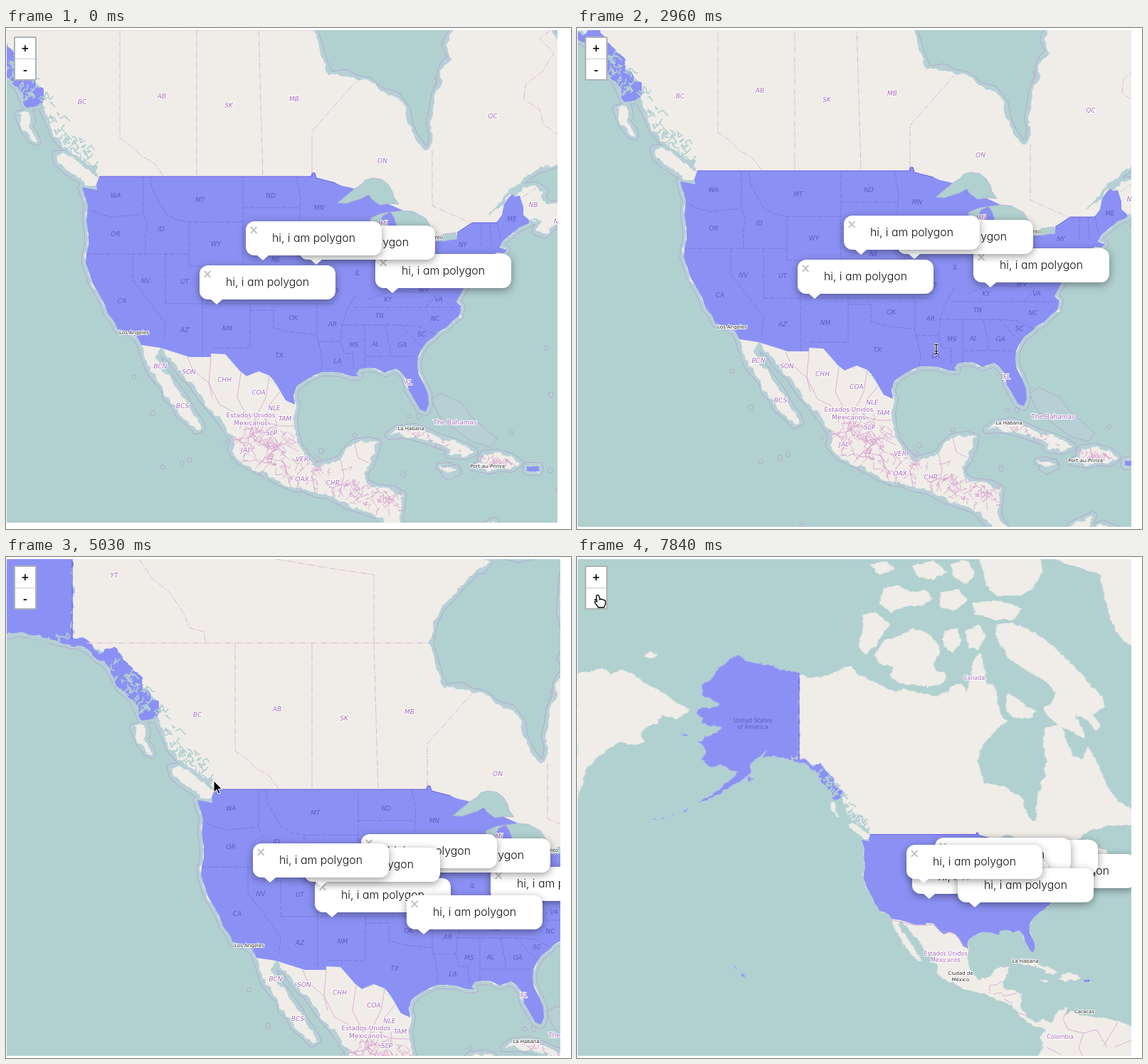
These frames come from a looping animation (794 px wide and 705 px high, 8 s). An HTML page:

```html
<!DOCTYPE html>
<html lang="en">
<head>
<meta charset="utf-8">
<title>Polygon popups</title>
<style>
html, body { margin: 0; width: 100%; height: 100%; overflow: hidden; background: #fff; }
#map { position: absolute; left: 1px; top: 3px; overflow: hidden; background: #b1d0d0; }
#stage { position: absolute; left: -1px; top: -3px; width: 794px; height: 705px; }
svg { position: absolute; left: 0; top: 0; overflow: visible; }
path { vector-effect: non-scaling-stroke; }
.rim { fill: none; stroke: #b0adcb; stroke-width: 12; stroke-linejoin: round; }
.shelf { fill: none; stroke: #b6d0d6; stroke-width: 10; stroke-linejoin: round; }
.ground { fill: #f0ede8; stroke: none; }
.us { fill: #8b91f4; stroke: none; }
.lake { fill: #b1d0d0; stroke: #b3add2; stroke-width: .7; }
.fjord { fill: none; stroke: #b1d0d0; stroke-width: 1.6; }
.state { fill: none; stroke: #7173dc; stroke-width: .8; stroke-dasharray: 7 2; }
.province { fill: none; stroke: #dcb4da; stroke-width: 1; stroke-dasharray: 9 2 2 2; }
.nation { fill: none; stroke: #665ce0; stroke-width: 1; }
.mesh { fill: none; stroke: #d7a0d0; stroke-width: .8; }
.ring { fill: #b6d0d6; stroke: #b0adcb; stroke-width: 1; }
text { font: 9px "DejaVu Sans", sans-serif; text-anchor: middle; dominant-baseline: central;
  fill: #a266b4; stroke: #fff; stroke-width: 2px; paint-order: stroke; }
.abbr text { font-style: italic; }
.inside text { fill: #5f58c2; stroke: none; }
.city text { font-size: 7px; fill: #222; }
#far text { font-size: 8px; }
#far .city text { font-size: 7px; }
.popup { position: absolute; width: 191px; height: 48px; border-radius: 12px; background: #fff;
  box-shadow: 0 3px 12px rgba(0,0,0,.4); color: #111; text-align: center;
  font: 300 15.8px/47px Inter, sans-serif; font-feature-settings: "cv11"; }
.popup::before { content: "×"; position: absolute; left: 4px; top: 4px; color: #c3c3c3;
  font: bold 17px/17px "DejaVu Sans", sans-serif; }
.popup::after { content: ""; position: absolute; left: 16px; top: 47.5px;
  border: 8px solid transparent; border-top: 7px solid #fff; border-bottom: 0; }
#zoom { position: absolute; left: 11px; top: 12px; width: 28px; height: 58px; border: 2px solid #aeb3b3;
  border-radius: 2px; background: #fff; font: 18px/29px "Open Sans", sans-serif; text-align: center; font-weight: 600; }
#zoom div + div { border-top: 1px solid #ccc; }
#desk { position: absolute; top: 0; right: 0; bottom: 0; background: linear-gradient(#8a8880, #e4e2df 6%,
  #8f8d87 20%, #a9a7a2 35%, #d8d6d2 50%, #c9c7c2 59%, #75756e 63%, #66706f 80%, #4e606e); }
</style>
</head>
<body>
<div id="map"><div id="stage">
<svg width="794" height="705">
<defs>
  <filter id="rough" x="-2%" y="-2%" width="104%" height="104%" color-interpolation-filters="sRGB">
    <feTurbulence type="fractalNoise" baseFrequency=".07" numOctaves="3" seed="4"/>
    <feDisplacementMap in="SourceGraphic" scale="11" xChannelSelector="R" yChannelSelector="G"/>
  </filter>
  <g id="lower">
    <path d="M131 209H431V490L418 497 408 505 404 517 406 530 393 524 386 512 378 498 370 489 355 483 345 487 338 490 328 482 318 470 308 459 288 458 288 463 258 463 217 450 190 446 185 436 172 428 157 424 152 413 143 402 138 388 131 375 122 360 117 345 112 330 113 318 116 305 116 290 113 270 115 250 111 238 107 224 118 226 128 228 127 220Z"/>
    <path d="M428 209 430 204 434 204 436 211 447 214 463 218 472 222 486 225 494 228 556 256 590 300 614 300 634 297 634 288 655 274 689 274 697 263 700 248 706 239 711 234 715 237 722 236 727 252 727 263 735 270 735 275 722 280 710 290 698 300 694 309 703 312 700 317 690 316 670 328 655 350 640 372 633 385 640 392 637 405 628 412 618 422 607 428 600 436 591 442 584 452 579 463 578 475 580 487 587 501 593 515 594 530 590 540 582 537 574 523 566 510 563 495 556 485 548 479 540 482 532 485 520 479 508 478 497 480 492 487 496 490 487 490 478 488 470 485 456 484 444 484 428 491Z"/>
    <path d="M732 617h17v7h-17z"/>
  </g>
  <g id="alaska">
    <g transform="matrix(2 0 0 2 -693 -572)">
      <path d="M312 163 300 160 285 158 270 152 255 150 240 147 228 138 215 143 207 150 195 160 188 172 176 178 176 195 188 200 200 208 190 212 172 213 167 220 178 226 175 235 190 237 203 240 197 248 180 252 175 262 182 275 175 285 190 297 203 292 215 300 225 302 218 312 205 322 190 335 170 345 180 344 200 333 220 320 235 312 245 303 243 290 255 283 265 272 262 283 275 280 290 283 303 287 312 288Z"/>
      <path d="M144 248l13 2-3 3zM171 258l8 1-3 4zM240 309l8 2-6 8zM150 357l8-4-6 6zM132 363l6-3-4 5zM118 368l6-2-4 4zM108 368l5 0-4 2zM211 573l3 2-3 1zM221 577l4 2-3 1zM230 584l6 4-3 4z"/>
    </g>
    <path transform="translate(-162 -118)" d="M90 113 112 115 120 125 132 135 142 130 152 126 162 139 168 150 180 158 190 170 197 187 205 197 214 203 214 218 207 227 190 228 185 215 178 200 160 185 150 165 140 150 128 143 115 130 100 123 90 124Z"/>
  </g>
  <g id="land">
    <use href="#lower"/><use href="#alaska"/>
    <path d="M-67-116H506L493-93 478-78 466-63 450-48 438-23 433 4 440 27 447 50 455 67 478 64 492 72 510 75 528 90 548 95 563 115 566 135 575 155 588 172 610 175V300H520L430 215H131L126 196 101 181 81 166 68 151 61 132 52 115 46 100 30 75 10 50-10 20-40 10-67-3Z"/>
    <path d="M588 172 597 170 600 150 596 135 600 115 603 95 610 80 612 60 617 50 627 42 618 25 622 15 628 3 617-42 621-92 667-102 687-48 701-12 727-2 743-42 770 10 797 72 830 118 880 140V180L795 185 770 192 745 200 728 212 708 230 690 248 676 264 694 252 712 236 728 224 745 222 757 230 752 240 762 248 795 252V268L772 276 757 290 745 286 752 272 735 270 720 270 650 290 610 295 588 280Z"/>
    <path d="M70 178 85 178 105 190 122 205 133 214 130 222 118 221 100 210 85 200 73 190ZM17 122 33 118 36 130 32 140 40 150 43 160 36 157 26 143Z"/>
    <path d="M217 450 258 463 288 463 288 458 308 459 328 482 338 490 355 483 370 489 386 512 408 528 404 550 406 570 412 590 424 605 436 617 455 612 470 607 478 595 490 584 510 581 522 584 518 598 512 615 502 626 505 640 520 647 545 650 557 657 555 675 552 695 570 720 545 705 530 693 520 685 500 678 480 672 468 665 452 657 435 655 420 648 405 647 388 640 370 630 350 620 330 610 317 595 320 580 312 568 300 550 285 533 275 520 268 510 262 500 250 490 240 478 232 465 222 459Z"/>
    <path d="M190 446 217 450 212 460 218 478 228 490 240 507 250 520 258 535 270 552 275 562 268 566 255 553 243 543 236 528 226 520 222 505 212 495 202 482 196 465Z"/>
    <path d="M538 573 550 565 575 562 590 568 610 577 630 583 648 590 658 597 645 602 622 600 625 592 605 585 585 578 560 572ZM668 605 672 600 690 598 710 604 721 612 710 620 695 618 680 622 658 618 670 613ZM610 618 622 617 634 622 622 626Z"/>
    <g transform="matrix(2 0 0 2 -693 -572)">
      <path d="M312 163 325 170 345 168 357 165 370 158 385 153 395 165 415 175 430 182 445 190 460 185 475 190 490 193 505 195 520 190 528 180 540 178 548 190 553 172 555 155 560 140 568 135 573 160 576 180 585 178 590 190 592 210 597 225 605 230 600 236H312Z"/>
      <path d="M0 163 20 162 35 155 48 165 62 158 80 165 100 180 120 190 140 205 158 215 150 222 140 228 120 222 112 235 100 237 90 248 95 260 80 265 60 260 45 270 25 285 12 300 8 320 0 340ZM93 139 104 133 114 139 104 143Z"/>
      <path d="M402 80 418 78 428 85 440 95 428 110 420 125 405 137 396 125 400 105ZM418 140 430 118 455 110 470 100 490 105 505 120 510 135 500 150 505 160 520 165 515 178 495 182 470 180 450 177 440 165 445 155 425 150ZM515 105 535 100 540 118 528 135 515 125ZM545 105 565 95 575 110 565 130 552 128Z"/>
      <path d="M430 45 450 38 470 50 490 45 500 60 485 68 460 70 440 78 425 65ZM510 50 535 45 550 60 530 75 510 70ZM555 65 590 60 625 72 615 88 585 88 560 80ZM565 0 650 0 655 20 640 45 620 55 590 55 575 40ZM412 10 435 6 447 16 425 26ZM470 12 500 5 520 20 500 32 480 28ZM525 10 548 4 560 25 545 38 530 28Z"/>
      <path d="M590 95 610 92 630 100 650 110 670 125 685 140 705 160 722 180 738 195 742 210 725 222 735 235 730 245 715 228 700 222 712 245 715 258 695 245 675 235 660 222 655 212 668 205 672 190 660 175 640 165 625 155 610 145 595 125 588 108ZM605 190 620 200 632 210 645 215 640 225 625 228 612 225 602 212Z"/>
      <path d="M662 0 690 10 715 18 735 24 742 58 750 90 765 115 790 135V0Z"/>
      <path d="M615 612 625 615 622 632 630 645 645 655 655 650 667 655 675 640 690 633 685 645 697 639 715 647 740 648 765 655 790 665V720H640L655 690 650 675 660 665 645 661 632 655 620 642 608 630Z"/>
    </g>
  </g>
</defs>
<g id="world">
  <g class="near">
    <use href="#land" class="rim"/><use href="#land" class="shelf"/>
    <path class="ring" d="M598 522 612 514 640 528 655 548 690 578 680 590 655 582 625 560 608 545ZM612 618 635 614 640 628 622 636 612 630Z"/>
    <path class="ring" id="islets"/>
  </g>
  <use href="#land" class="ground" filter="url(#rough)"/>
  <path id="tiles" fill="#ededed" d="M-195-100H-2V38H-195ZM-195 578H-2V800H-195Z"/>
  <use href="#lower" class="us"/>
  <use href="#alaska" class="us" filter="url(#rough)"/>
  <path class="fjord" id="fjords"/>
  <path class="lake" d="M466 246 478 236 490 226 500 220 505 214 515 211 528 213 537 220 543 230 545 238 552 248 540 247 525 249 513 240 510 234 500 240 490 243 478 247ZM513 267 527 261 540 259 530 264 524 275 520 310 508 310 510 285ZM540 259 556 257 572 258 590 268 597 280 590 300 555 300 550 280 545 266ZM600 298 615 290 632 288 634 296 615 300Z"/>
  <path class="nation" d="M131 209H430V204H434L436 211 447 214 463 218M634 288 655 274H689M-69-246V-3"/>
  <g class="near">
    <path class="state" d="M120 256 135 263 150 266 192 262M193 209V262L199 276 196 290V318M113 318H258M203 209 205 225 215 245 225 262 240 270 257 273H333M257 273V335H333V209M224 318V388M276 335V463M224 388H460M178 318V355L224 415 222 440M343 388V450H290M343 397H376V422L400 428 437 432M437 388V432L441 450 445 470 443 484M437 441H470"/>
    <path class="state" d="M492 375 480 395 473 415 470 441 475 458H487L489 480M504 418V478M533 418 540 452V462M470 418H555L580 420 605 432M488 393H635M505 462H575M555 418 575 440 585 448M408 209 414 240 412 272M333 253H412M668 274V305M680 274 682 305M690 272 695 300M510 382 540 370 590 372M590 393 605 375"/>
    <path class="province" d="M160 3V155L175 165 190 180 208 190 222 209M268 3V209M355 3 361 209M-50 3H433M430 205V145L492 75M599 172V250L655 275M765 3 750 15 770 35 755 60 730 80 728 100 750 115 755 135 775 150M726 238 745 225M25-115 43-88 68-68 88-38 96-18 116-13 118 0M218-115 288-103 355-93V3"/>
    <path class="mesh" d="M255 463 262 480 285 500 290 520M288 463 285 500 300 530 320 540M330 485 325 520 340 550 335 570M370 490 365 520 355 540 340 550M385 512 370 530 365 555 385 560 405 560M320 580 345 575 365 590 390 585 410 595M350 620 365 605 390 610 400 645M440 617 430 630 435 655M470 607 475 630 468 660M490 585 495 605 510 612M598 85l8-8-4-8 8 6"/>
    <path class="mesh" id="mesh"/>
  </g>
  <g class="near" id="labels"></g>
</g>
<g id="far">
  <path class="mesh" stroke-width="1.1" d="M441 510 456 514 475 518 491 518 500 517 511 527 524 528 532 531 549 551M580 614V603L590 602 597 597M585 615 595 613 600 618 618 614M600 622 612 628M616 640 630 645M690 636 683 650 690 665 712 670 705 690 710 702M660 690 680 700M712 670 730 665 745 690M740 688 760 655M755 690 779 680"/>
  <g id="farLabels"></g>
</g>
</svg>
<div id="popups"></div>
<div id="zoom"><div>+</div><div>-</div></div>
</div></div>
<div id="desk"></div>
<svg width="794" height="705"><g id="cursor">
  <path id="arrow" d="M0 0V16L4 12.5 6.5 18 9 17 6.5 11.5H11.5Z" stroke="#fff"/>
  <g id="beam" fill="none">
    <path d="M-3-7Q0-7 0-5V5Q0 7-3 7M3-7Q0-7 0-5M3 7Q0 7 0 5M-2 3H2" stroke="#fff" stroke-width="3"/>
    <path d="M-3-7Q0-7 0-5V5Q0 7-3 7M3-7Q0-7 0-5M3 7Q0 7 0 5M-2 3H2" stroke="#000" stroke-width="1.2"/>
  </g>
  <path id="hand" d="M-2 1Q0-2 2 1L3 6Q5 4 6 6 8 5 9 7 11 6 11 9V12L9 17H1L-4 10Q-5 7-1 9Z" fill="#fff" stroke="#000" stroke-width="1.3"/>
</g></svg>
<script>
const $ = id => document.getElementById(id);
const LOOP = 8000;

let seed = 11;
const rand = () => (seed = seed * 16807 % 2147483647) / 2147483647;

// Short random strokes scattered around a line.
function scatter(id, x0, y0, x1, y1, spread, count, step) {
  let d = $(id).getAttribute('d') || '';
  const jitter = size => ((rand() - .5) * size).toFixed(1);
  for (let i = 0; i < count; i++) {
    const k = rand();
    d += `M${x0 + (x1 - x0) * k + +jitter(spread)} ${y0 + (y1 - y0) * k + +jitter(spread)}`;
    for (let j = 0; j < 3; j++) d += `l${jitter(step)} ${jitter(step)}`;
  }
  $(id).setAttribute('d', d);
}
scatter('fjords', 0, 30, 46, 105, 26, 40, 14);
scatter('fjords', 52, 112, 126, 200, 20, 34, 14);
scatter('fjords', -150, 0, -70, 4, 18, 14, 14);
scatter('mesh', 330, 585, 460, 640, 42, 60, 20);
scatter('mesh', 340, 560, 395, 590, 36, 40, 18);
scatter('mesh', 465, 650, 550, 668, 28, 75, 12);
scatter('mesh', 670, 608, 715, 612, 12, 28, 10);
scatter('mesh', 560, 567, 640, 594, 6, 14, 10);

const islets = [[180, 491], [206, 542], [220, 618], [247, 613], [258, 608], [443, 595], [490, 573],
  [558, 628], [567, 546], [580, 546], [710, 569], [766, 516], [759, 450], [765, 622], [776, 650], [278, 709]];
$('islets').setAttribute('d', $('islets').getAttribute('d') || islets.map(([x, y], i) =>
  `M${x - 3} ${y}a3 ${3 + i % 2} 0 1 0 6 0a3 ${3 + i % 2} 0 1 0-6 0`).join(''));

function addLabels(parent, cls, list) {
  const items = list.split(';').map(item => {
    const [, name, x, y] = item.trim().match(/^(.+?) (-?\d+) (-?\d+)$/);
    return `<text x="${x}" y="${y}">${name}</text>`;
  });
  $(parent).innerHTML += `<g class="${cls}">${items.join('')}</g>`;
}
addLabels('labels', 'abbr inside', `WA 154 236;OR 154 290;CA 163 384;NV 196 356;ID 218 283;MT 273 242;WY 295 304;
  UT 251 357;AZ 251 425;NM 311 423;ND 372 236;MN 440 253;NE 379 326;OK 404 408;TX 384 461;AR 459 417;MO 460 370;
  LA 466 469;MS 489 446;AL 519 445;GA 557 446;SC 584 431;NC 603 409;TN 525 405;KY 537 382;IL 494 345;
  VA 608 382;WV 587 368;NY 642 305;ME 711 269`);
addLabels('labels', 'abbr', `YT -10 -92;BC 107 104;AB 219 96;SK 313 109;MB 405 100;ON 529 187;QC 684 124;NB 741 249;
  NS 776 272;BCN 217 476;SON 257 484;BCS 248 532;CHH 307 495;COA 355 513;NLE 377 535;TAM 392 550;SLP 373 570;
  JAL 337 594;VER 416 607;OAX 416 635;CHP 459 640;MI 531 275;FL 566 499`);
addLabels('labels', '', 'The Bahamas 631 555;Estados Unidos 344 545;Mexicanos 344 556');
addLabels('labels', 'city', 'Los Angeles 180 429;La Habana 569 564;Port-au-Prince 677 617;Toronto 601 295');
addLabels('farLabels', '', 'Canada 558 170;Estados Unidos 518 558;Mexicanos 518 567;Colombia 679 675');
addLabels('farLabels', 'inside', 'United States 247 230;of America 247 239');
addLabels('farLabels', 'city', 'Ciudad de 539 586;México 539 595;La Habana 630 569;Caracas 713 640');

// Anchor point, opening and closing time, in stacking order.
const popups = [[543, 372, 0], [436, 332, 0], [361, 326, 0], [296, 388, 0],
  [425, 412, 3550], [281, 345, 4140], [209, 339, 4570, 6650]].map(([x, y, from, to = LOOP]) => {
  const box = document.createElement('div');
  box.className = 'popup';
  box.textContent = 'hi, i am polygon';
  $('popups').append(box);
  return { box, x, y, from, to };
});

// Each row starts with the time from which it holds.
const sizes = [[0, 775, 696], [450, 752, 694], [600, 724, 690], [750, 712, 689], [1190, 737, 691], [1340, 779, 702]];
const views = [[0, 0, 0, 1], [2960, 38, -8, 1], [3110, 70, -22, 1], [3260, 95, -26, 1], [3405, 162, 118, 1],
  [7840, 346.5, 286, .5]];
const pointer = [[0, ''], [1940, 'arrow', 700, 640], [2085, 'arrow', 600, 540], [2230, 'arrow', 500, 455],
  [2375, 'arrow', 440, 418], [2520, 'arrow', 418, 410], [2670, 'arrow', 413, 407], [2815, 'arrow', 467, 460],
  [2960, 'beam', 505, 452], [3110, 'beam', 537, 438], [3260, 'beam', 562, 434], [3405, 'beam', 629, 578],
  [3550, 'arrow', 587, 530], [3700, 'hand', 441, 468], [3845, 'hand', 442, 467], [3990, 'arrow', 444, 463],
  [4280, 'arrow', 410, 459], [4425, 'arrow', 371, 456], [4720, 'arrow', 340, 420], [4870, 'arrow', 310, 360],
  [5020, 'arrow', 292, 315], [5170, 'arrow', 312, 345], [5320, 'arrow', 335, 377], [5470, 'arrow', 332, 370],
  [5620, 'arrow', 324, 350], [5770, 'arrow', 314, 330], [5920, 'arrow', 308, 317], [6210, 'arrow', 310, 324],
  [6355, 'arrow', 330, 370], [6500, 'hand', 354, 413], [6650, 'arrow', 350, 400], [6800, 'arrow', 270, 300],
  [6950, 'arrow', 150, 170], [7100, 'arrow', 80, 100], [7250, 'arrow', 48, 69], [7400, 'hand', 36, 60],
  [7540, 'hand', 29, 54]];
const at = (rows, t) => rows.findLast(row => row[0] <= t).slice(1);
const show = (el, visible) => { el.style.display = visible ? '' : 'none'; };

function draw(t) {
  const [right, bottom] = at(sizes, t);
  $('map').style.width = right - 1 + 'px';
  $('map').style.height = bottom - 3 + 'px';
  $('desk').style.left = right + 40 + 'px';
  show($('desk'), right + 40 < 794);

  const [dx, dy, zoom] = at(views, t);
  $('world').setAttribute('transform', `matrix(${zoom} 0 0 ${zoom} ${dx} ${dy})`);
  document.querySelectorAll('.near').forEach(el => show(el, zoom === 1));
  show($('far'), zoom < 1);
  show($('tiles'), t >= 3110 && t < 3405);

  for (const { box, x, y, from, to } of popups) {
    show(box, t >= from && t < to);
    box.style.left = x * zoom + dx - 24 + 'px';
    box.style.top = y * zoom + dy - 54 + 'px';
  }

  const [kind, x = 0, y = 0] = at(pointer, t);
  for (const name of ['arrow', 'beam', 'hand']) show($(name), name === kind);
  $('cursor').setAttribute('transform', `translate(${x} ${y})`);
}

let last = -1;
function tick(now) {
  const t = now % LOOP;
  const step = Math.floor(t / 5);
  if (step !== last) draw(t);
  last = step;
  requestAnimationFrame(tick);
}
draw(0);
requestAnimationFrame(tick);
</script>
</body>
</html>
```
